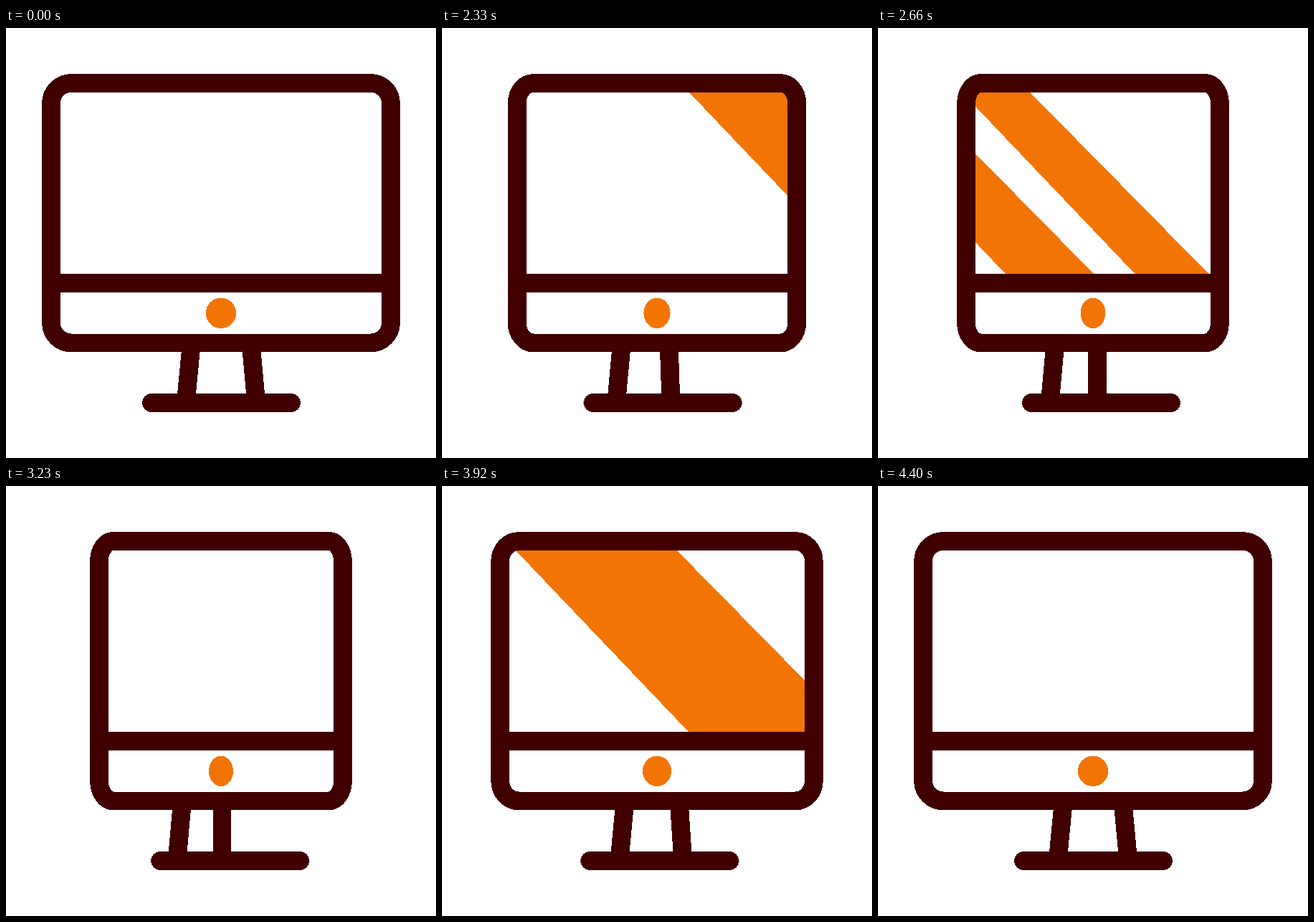
Animation of 600 by 600 pixels, one loop 4430 ms. Source, as an HTML page:

```html
<!DOCTYPE html>
<html lang="en">
<head>
<meta charset="utf-8">
<title>Swivelling monitor</title>
<style>
  html, body { margin: 0; width: 100%; height: 100%; overflow: hidden; background: #fff; }
  svg { display: block; width: 100vw; height: 100vh; shape-rendering: crispEdges; }

  .line { fill: none; stroke: #400000; stroke-width: 25.8; }
  .round { stroke-linecap: round; }
  .accent { fill: #f27405; }

  /* One turn: still until 45.147 %, turned at 72.912 %, back at 100 %.
     The default easing drives the way out, the 72.912 % keyframe the way back. */
  .turn { animation: 4430ms cubic-bezier(.22, 0, .01, 1) infinite; }
  .case { animation-name: case; }
  .bar { animation-name: bar; }
  .dot { animation-name: dot; }
  .leg-l { animation-name: leg-l; }
  .leg-r { animation-name: leg-r; }
  .base { animation-name: base; }
  .wide { animation-name: wide; }
  .narrow { animation-name: narrow; }
  .sweep-a { animation: sweep-a 4430ms cubic-bezier(.35, 0, .43, 1) infinite; }
  .sweep-b { animation: sweep-b 4430ms cubic-bezier(.449, 0, .546, 1) infinite; }

  @keyframes case {
    0%, 45.147%, 100% { x: 63px; width: 474px; rx: 28px; }
    72.912% { x: 130px; width: 340px; rx: 20px; animation-timing-function: cubic-bezier(.53, 0, .38, 1); }
  }
  @keyframes bar {
    0%, 45.147%, 100% { x: 63px; width: 474px; }
    72.912% { x: 130px; width: 340px; animation-timing-function: cubic-bezier(.53, 0, .38, 1); }
  }
  @keyframes dot {
    0%, 45.147%, 100% { rx: 21.2px; }
    72.912% { rx: 17px; animation-timing-function: cubic-bezier(.53, 0, .38, 1); }
  }
  @keyframes leg-l {
    0%, 45.147%, 100% { d: path("M258.8 440L250.8 523"); }
    72.912% { d: path("M246 440L238.6 523"); animation-timing-function: cubic-bezier(.53, 0, .38, 1); }
  }
  @keyframes leg-r {
    0%, 45.147%, 100% { d: path("M341.6 440L349.2 523"); }
    72.912% { d: path("M301.5 440L301.5 523"); animation-timing-function: cubic-bezier(.53, 0, .38, 1); }
  }
  @keyframes base {
    0%, 45.147%, 100% { transform: translateX(0); }
    72.912% { transform: translateX(12.2px); animation-timing-function: cubic-bezier(.53, 0, .38, 1); }
  }

  /* The glare bands slim down while the screen turns */
  @keyframes wide {
    0%, 45.147%, 100% { d: path("M-12.4 77L253.5 356L439.8 356L165.2 77Z"); }
    72.912% { d: path("M-12.4 77L253.5 356L369.8 356L95.2 77Z"); animation-timing-function: cubic-bezier(.53, 0, .38, 1); }
  }
  @keyframes narrow {
    0%, 45.147%, 100% { d: path("M-12.4 77L253.5 356L391.8 356L117.2 77Z"); }
    72.912% { d: path("M-12.4 77L253.5 356L352.8 356L78.2 77Z"); animation-timing-function: cubic-bezier(.53, 0, .38, 1); }
  }
  @keyframes sweep-a {
    0%, 45.147%, 100% { transform: translateX(540px); }
    72.912% { transform: translateX(-320px); animation-timing-function: cubic-bezier(.711, 0, .5, 1); }
  }
  @keyframes sweep-b {
    0%, 45.147%, 100% { transform: translateX(700px); }
    72.912% { transform: translateX(-320px); animation-timing-function: cubic-bezier(.711, 0, .473, 1); }
  }
</style>
</head>
<body>
<svg viewBox="0 0 600 600">
  <clipPath id="screen">
    <rect class="turn case" x="63" y="77" width="474" height="362.4" rx="28" ry="28"/>
  </clipPath>
  <g class="accent" clip-path="url(#screen)">
    <g class="sweep-a"><path class="turn wide" d="M-12.4 77L253.5 356L439.8 356L165.2 77Z"/></g>
    <g class="sweep-b"><path class="turn narrow" d="M-12.4 77L253.5 356L391.8 356L117.2 77Z"/></g>
  </g>
  <path class="line turn leg-l" d="M258.8 440L250.8 523"/>
  <path class="line turn leg-r" d="M341.6 440L349.2 523"/>
  <path class="line round turn base" d="M203 523H398"/>
  <rect class="turn bar" x="63" y="343.1" width="474" height="25.8" fill="#400000"/>
  <rect class="line turn case" x="63" y="77" width="474" height="362.4" rx="28" ry="28"/>
  <ellipse class="accent turn dot" cx="300" cy="397.8" rx="21.2" ry="21.2"/>
</svg>
</body>
</html>
```
